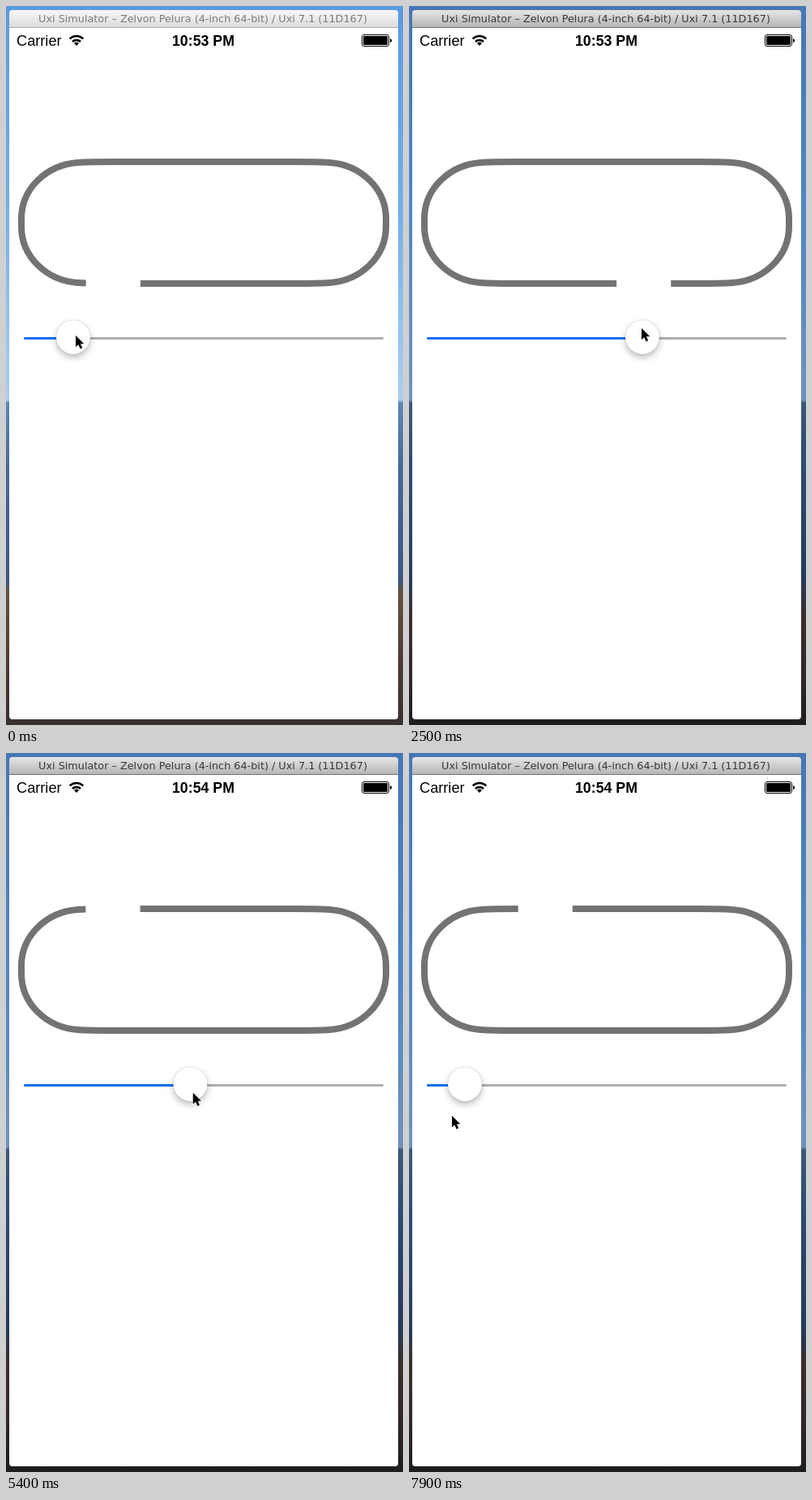
Recreate the animation shown at these times as an HTML page. Size 490 px wide and 886 px high, loop 8000 ms.

```html
<!DOCTYPE html>
<html lang="en">
<head>
<meta charset="utf-8">
<title>Slider and ring</title>
<style>
html, body { margin: 0; width: 100%; height: 100%; overflow: hidden; }
#stage {
  position: relative; width: 490px; height: 886px; overflow: hidden;
  background: linear-gradient(#5a9ae2, #72aeea 28%, #a9cff0 54.8%,
    #5d86b8 55.2%, #476a9c 64%, #3d5580 80%, #66503f 81.5%, #4a3a33 92%, #37302e);
}
#stage.active {
  background: linear-gradient(#4577b4, #4e86c8 28%, #6d93bd 54.8%,
    #3d5878 55.2%, #2f4a74 64%, #263a5c 80%, #3b2e2b 85%, #30272a 93%, #1f1c20);
}
#bar {
  position: absolute; left: 4px; top: 5px; width: 480px; height: 21px;
  border-bottom: 1px solid #a5a5a5; border-radius: 4px 4px 0 0;
  background: linear-gradient(#f8f8f8, #dcdcdc);
  font: 12.8px/22px "DejaVu Sans", sans-serif;
  color: #7b7b7b; text-align: center; white-space: pre;
}
.active #bar {
  background: linear-gradient(#e6e6e6, #b5b5b5);
  border-color: #747474; color: #383838;
}
#bar span { position: relative; left: -1px; }
#screen {
  position: absolute; left: 4px; top: 27px; width: 480px; height: 852px;
  background: #fff; border-radius: 0 0 4px 4px;
}
svg { position: absolute; left: 0; top: 0; }
text { font: 18.2px "Liberation Sans", Arial, sans-serif; }
#clock { font-size: 17.8px; font-weight: bold; text-anchor: middle; }
#track, #fill { position: absolute; left: 22px; top: 408px; height: 3px; border-radius: 1.5px; }
#track { width: 444px; background: #aeaeae; }
#fill { background: #0a70f2; }
#thumb {
  position: absolute; left: -21px; top: 387px; width: 42px; height: 42px;
  border-radius: 50%; background: #fff;
  box-shadow: 0 0 1px rgba(0,0,0,.3), 0 4px 8px rgba(0,0,0,.27);
}
</style>
</head>
<body>
<div id="stage">
  <div id="bar"><span>Uxi Simulator – Zelvon Pelura (4-inch 64-bit) / Uxi 7.1 (11D167)</span></div>
  <div id="screen"></div>
  <svg width="490" height="886">
    <text x="13" y="49">Carrier</text>
    <g fill="none" stroke="#000" stroke-width="2.6">
      <path d="M78.7 40.4a11.8 11.8 0 0 1 16.6 0M82 44a7.2 7.2 0 0 1 10 0"/>
      <path d="M87 49l-3-3.1a4.3 4.3 0 0 1 6 0z" fill="#000" stroke="none"/>
    </g>
    <text id="clock" x="243.5" y="49"></text>
    <rect x="439.5" y="35.5" width="33" height="14" rx="2.5" fill="none" stroke="#000"/>
    <rect x="441" y="37" width="30" height="11" rx="1.2"/>
    <path d="M474 40q2.2 .5 2.2 2.5t-2.2 2.5z"/>
    <path id="ring" fill="none" stroke="#737373" stroke-width="8" pathLength="1071.2"
      stroke-dasharray="1004.2 67"
      d="M130 192H358Q385 192 400 193C438 196 469 225 469 262V272C469 309 438 338 400 341Q385 342 358 342H130Q103 342 88 341C50 338 19 309 19 272V262C19 225 50 196 88 193Q103 192 130 192Z"/>
  </svg>
  <div id="track"></div>
  <div id="fill"></div>
  <div id="thumb"></div>
  <svg id="cursor" width="16" height="22" style="overflow:visible">
    <path d="M0 0V14.2L3.3 11.2L5.6 16.4L8.2 15.3L6 10.2H10.3Z" stroke="#fff" stroke-width="1.2" paint-order="stroke"/>
  </svg>
</div>
<script>
const LOOP = 8000, STEP = 100;
const $ = id => document.getElementById(id);

// time, thumb x, gap distance along the ring, pointer x, pointer y
const keys = [
  [0, 83, 797, 86, 406],
  [1000, 125, 1333, 116, 406],
  [2100, 318, 1642, 316, 399],
  [2500, 288, 1711, 287, 397],
  [3300, 92, 2011, 72, 427],
  [4600, 131, 3029, 125, 424],
  [6400, 348, 3403, 363, 412],
  [7900, 69, 4359, 53, 447]
];
const mix = (a, b, p) => a + (b - a) * p;
const value = x => (x - 43) / 401;

function draw(time) {
  const t = Math.floor(time % LOOP / STEP) * STEP;
  let i = 0;
  while (i < keys.length - 2 && t >= keys[i + 1][0]) i++;
  const a = keys[i], b = keys[i + 1];
  const p = Math.min(1, (t - a[0]) / (b[0] - a[0]));
  const [, x, , px, py] = a.map((n, k) => mix(n, b[k], p));

  // The slider sets the lap time, so speed goes as 1 / value.
  const v0 = value(a[1]);
  const lap = Math.log(value(x) / v0) / Math.log(value(b[1]) / v0);
  const gap = mix(a[2], b[2], lap);

  $("ring").style.strokeDashoffset = -((gap - 36 + 33.5) % 1071.2);
  $("fill").style.width = x - 22 + "px";
  $("thumb").style.transform = `translateX(${x}px)`;
  $("cursor").style.transform = `translate(${px}px, ${py}px)`;
  $("clock").textContent = t < 2900 ? "10:53 PM" : "10:54 PM";
  $("stage").classList.toggle("active", t >= 100);
}

const start = performance.now();
function tick() {
  draw(performance.now() - start);
  requestAnimationFrame(tick);
}
tick();
</script>
</body>
</html>
```
